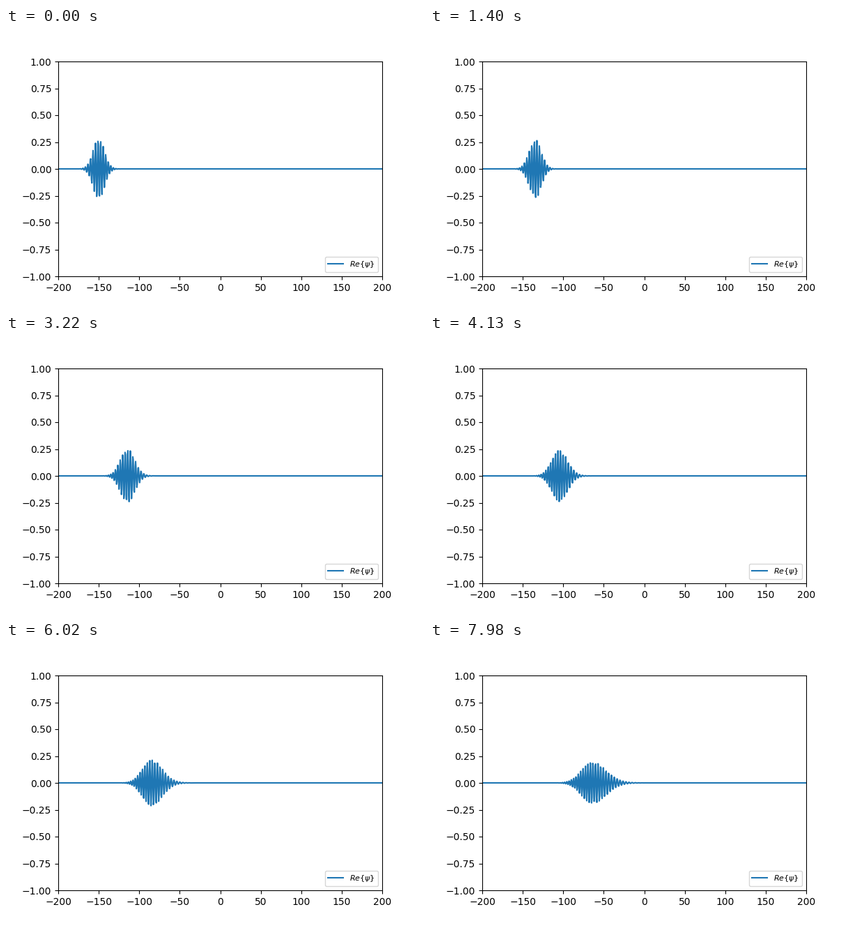
Write a matplotlib script that moves like this. It is 600 px wide and 400 px high and loops after 8 s.

```python
import numpy as np
import matplotlib.pyplot as plt
from matplotlib.animation import FuncAnimation

LOOP, TICK, HOLD = 8000, 20, 70      # ms: loop, redraw interval, time per step
STEPS = LOOP // HOLD + 1

# Grid and Gaussian wave packet
DX, DT = 0.5, 2.0
X0, K0, SIGMA = -150, 2.0, 5.0
x = np.linspace(-200, 200, 801)


def packet():
    norm = (2 * np.pi * SIGMA**2) ** -0.25
    return norm * np.exp(-(x - X0)**2 / (4 * SIGMA**2) + 1j * K0 * x)


def propagator():
    """Crank-Nicolson step for a free particle (hbar = m = 1)."""
    n = len(x)
    one = np.eye(n)
    ham = (one - 0.5 * (np.eye(n, k=1) + np.eye(n, k=-1))) / DX**2
    half = 0.5j * DT * ham
    return np.linalg.solve(one + half, one - half)


def evolve():
    step, psi = propagator(), packet()
    waves = [psi.real]
    for _ in range(STEPS - 1):
        psi = step @ psi
        waves.append(psi.real)
    return waves


waves = evolve()

fig, ax = plt.subplots(figsize=(6, 4), dpi=100)
ax.set_xlim(-200, 200)
ax.set_ylim(-1, 1)
line, = ax.plot(x, waves[0], label=r"$Re\{\psi\}$")
ax.legend(loc="lower right", fontsize=8)


def update(i):
    step = (i * TICK + TICK // 2) // HOLD
    line.set_ydata(waves[min(step, STEPS - 1)])
    return line,


anim = FuncAnimation(fig, update, frames=LOOP // TICK, interval=TICK,
                     repeat=True, repeat_delay=0)
plt.show()
```
